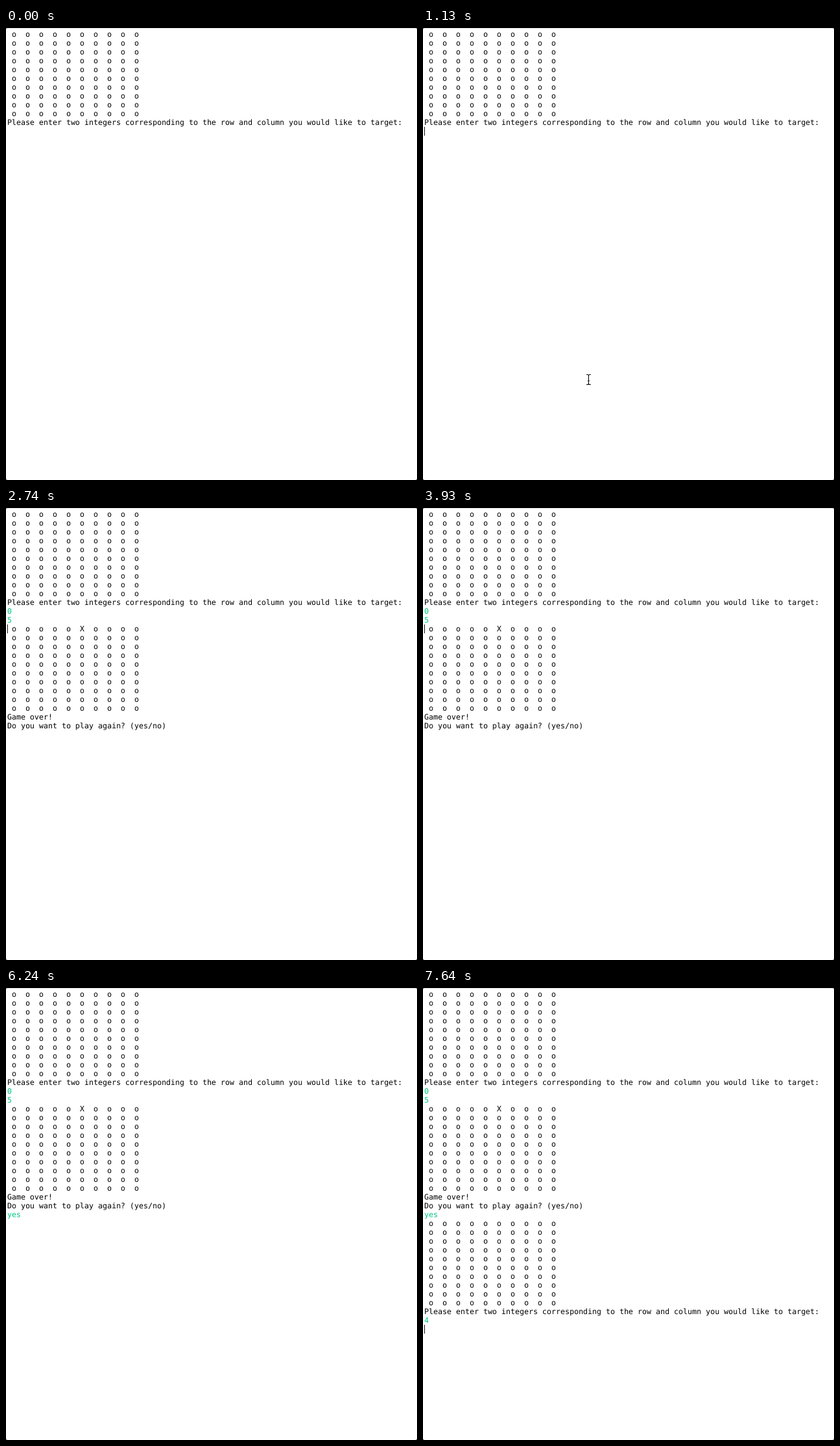
Write an HTML page that moves like this. It is 654 px wide and 718 px high and loops after 8 s.

```html
<!DOCTYPE html>
<html lang="en">
<head>
<meta charset="utf-8">
<title>Grid game console</title>
<style>
  html, body { margin: 0; width: 100%; height: 100%; overflow: hidden; background: #fff; }
  svg { display: block; width: 654px; height: 718px; }
  text {
    font: 12px "DejaVu Sans Mono", monospace;
    white-space: pre;
    text-rendering: geometricPrecision;
  }
</style>
</head>
<body>
<svg viewBox="0 0 654 718">
  <rect width="654" height="718" fill="#fff"/>
  <rect width="654" height="1" fill="#dcdcdc"/>
  <path d="M0 0h2l-2 2zM654 0h-2l2 2zM0 718h2l-2-2zM654 718h-2l2-2z" fill="#777"/>
  <g id="lines"></g>
  <rect id="caret" width="1" height="14" fill="#000"/>
  <path id="beam" d="M-3.5-8H-2Q0-8 0-6V6Q0 8-2 8H-3.5M3.5-8H2Q0-8 0-6M0 6Q0 8 2 8H3.5M-1.5 2H1.5"
    fill="none" stroke="#000" stroke-width="1.1"/>
</svg>
<script>
const LOOP = 8000, STEP = 70, ROW = 14, TOP = 3, LEFT = 2, CHAR = 7.224;
const INK = "#000", INPUT = "#00c87d";
const PROMPT = "Please enter two integers corresponding to the row and column you would like to target:";
const caret = document.getElementById("caret");
const beam = document.getElementById("beam");
const lines = [];

function print(at, str, fill = INK, times = null) {
  const el = document.createElementNS("http://www.w3.org/2000/svg", "text");
  el.setAttribute("x", LEFT);
  el.setAttribute("y", TOP + 11 + ROW * lines.length);
  el.setAttribute("fill", fill);
  document.getElementById("lines").append(el);
  lines.push({ el, at, str, times });
}

// Each entry in times is the moment one more character is typed.
const type = (str, ...times) => print(times[0], str, INPUT, times);

function board(at, hit = -1) {
  for (let r = 0; r < 10; r++) {
    let row = "";
    for (let c = 0; c < 10; c++) row += r * 10 + c === hit ? " X " : " o ";
    print(at, row);
  }
}

board(0);
print(0, PROMPT);
type("0", 1550);
type("5", 2530);
board(2740, 5);
print(2740, "Game over!");
print(2740, "Do you want to play again? (yes/no)");
type("yes", 5680, 5890, 6100);
board(6380);
print(6380, PROMPT);
type("4", 7430);

// [time, row, column]; a time alone hides the caret
const carets = [
  [0], [990, 11, 0], [1550, 11, 1], [1620], [1690, 12, 0], [2320],
  [2530, 12, 1], [2740, 13, 0], [3300], [3930, 13, 0], [4490],
  [5050, 13, 0], [5610], [5680, 25, 1], [5890, 25, 2], [6100, 25, 3],
  [6240], [6380, 26, 0], [7010], [7430, 37, 1], [7570], [7640, 38, 0]
];

const mix = (a, b, p) => a + (b - a) * p;
const stepped = (t, from, count) =>
  Math.max(0, Math.min(count, Math.floor((t - from) / STEP))) / count;

function show(el, on) {
  el.setAttribute("visibility", on ? "visible" : "hidden");
}

function draw(t) {
  for (const { el, at, str, times } of lines) {
    const n = times ? times.filter(k => t >= k).length : t >= at ? str.length : 0;
    const now = str.slice(0, n);
    if (el.textContent !== now) el.textContent = now;
  }

  const [, row, col] = carets.filter(c => t >= c[0]).pop();
  show(caret, row !== undefined);
  if (row !== undefined) {
    caret.setAttribute("x", Math.floor(LEFT + col * CHAR));
    caret.setAttribute("y", TOP + ROW * row);
  }

  show(beam, t >= 500 && t < 1550);
  const rise = stepped(t, 500, 4), slide = stepped(t, 990 - STEP, 3);
  const ease = 1 - (1 - rise) ** 2;
  const x = mix(mix(265.5, 277.5, ease), 263.5, slide);
  const y = mix(mix(682.5, 567.5, ease), 558.5, slide);
  beam.setAttribute("transform", `translate(${x} ${y})`);
}

const start = performance.now();
function tick() {
  draw((performance.now() - start) % LOOP);
  requestAnimationFrame(tick);
}
tick();
</script>
</body>
</html>
```
